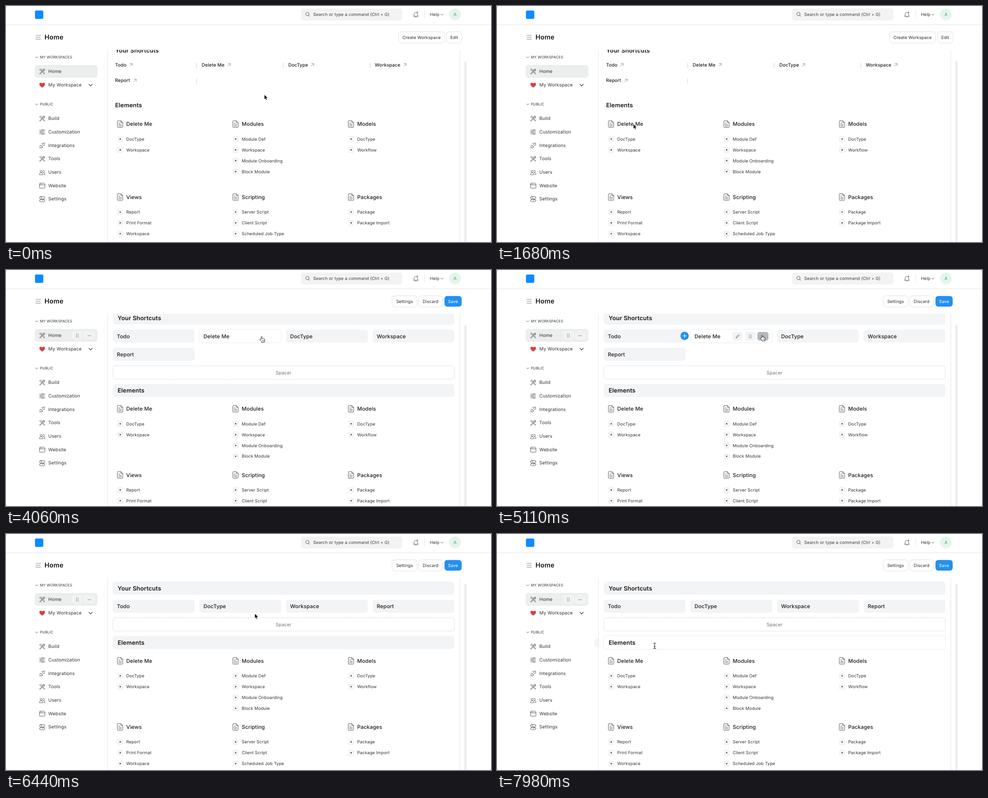
Write an HTML page that moves like this. It is 1072 px wide and 522 px high and loops after 8 s.

```html
<!DOCTYPE html>
<html lang="en">
<head>
<meta charset="utf-8">
<title>Workspace editor</title>
<style>
html, body { margin: 0; width: 100%; height: 100%; overflow: hidden; background: #bbb; }
svg { display: block; width: 1072px; height: 522px; }
text { font-family: Inter, "Open Sans", sans-serif; letter-spacing: .01em; fill: #333; white-space: pre; text-rendering: geometricPrecision; }
.m { font-weight: 500; fill: #1c1c1c; }
.b { font-weight: 600; fill: #171717; }
.i { fill: none; stroke: #444; stroke-width: .9; stroke-linecap: round; stroke-linejoin: round; }
.thin { stroke: #777; stroke-width: .8; }
.blk { fill: #f3f4f6; }
.spacer { fill: #fff; stroke: #c8ccd0; stroke-dasharray: 2 1.6; }
.btn { fill: #fff; filter: drop-shadow(0 .4px .8px rgba(0,0,0,.28)); }
.btn.hot { fill: #f0f1f2; }
.blk.hot { fill: #fff; }
.blk.hot, .spacer.hot { filter: drop-shadow(0 .4px 1px rgba(0,0,0,.18)); }
.save { fill: #2490ef; filter: none; }
.save.hot { fill: #1c82dc; }
.tool { fill: #f3f4f6; }
.tool.hot { fill: #b4b9be; }
.item, .link { fill: transparent; }
.item.hot { fill: #f3f3f3; }
.link.hot + g text { fill: #555; }
.menu { fill: #fff; filter: drop-shadow(0 1px 2px rgba(0,0,0,.22)); }
.panel { fill: #fff; filter: drop-shadow(0 0 1.3px rgba(0,0,0,.22)); }
</style>
</head>
<body>
<svg id="stage" viewBox="0 0 1072 522"></svg>
<script>
const SCALE = .7293, STEP = 70, LOOP = 8000;
const stage = document.getElementById('stage');

// y is the middle of the capitals
const text = (x, y, s, px = 13, cls = '', extra = '') =>
  `<text x="${x}" y="${y + px * .265}" font-size="${px * SCALE}" class="${cls}" ${extra}>${s}</text>`;
const rect = (x, y, w, h, r, extra) =>
  `<rect x="${x}" y="${y}" width="${w}" height="${h}" rx="${r}" ${extra}/>`;
const hit = (x, y, w, h, r, cls, cursor = 'hand', extra = '') =>
  rect(x, y, w, h, r, `class="${cls}" data-cursor="${cursor}" ${extra}`);
const icon = (x, y, d, cls = '', extra = '') =>
  `<path transform="translate(${x} ${y})" d="${d}" class="i ${cls}" ${extra}/>`;
const dots = (x, y) => [0, 1, 2, 3, 4, 5].map(i =>
  `<circle cx="${x - 1.8 + i % 2 * 3.6}" cy="${y - 3.2 + (i >> 1) * 3.2}" r=".85" fill="#666"/>`).join('');
const ellipsis = (x, y) => [-2.6, 0, 2.6].map(d =>
  `<circle cx="${x + d}" cy="${y}" r=".75" fill="#444"/>`).join('');
const group = (id, body) => `<g id="${id}">${body}</g>`;

const ICONS = {
  tools: 'M-5.5-4.3L-3.8-6-.6-3.4-1.2-1.2-3.4-1.8ZM1 1.6L4.6 5.6 5.8 4.4 2.2.8M-5.6 4.6L1-1.8C.5-4 2.2-6 4.6-5.4L2.8-3.6 3.7-2.6 5.5-4.3C6-2 4.2-.2 1.9-.8L-4.4 5.6Z',
  sliders: 'M-6-4H0M3-4H6M-6 0H-4M-1 0H6M-6 4H0M3 4H6M0-4a1.5 1.5 0 1 0 3 0 1.5 1.5 0 1 0-3 0M-4 0a1.5 1.5 0 1 0 3 0 1.5 1.5 0 1 0-3 0M0 4a1.5 1.5 0 1 0 3 0 1.5 1.5 0 1 0-3 0',
  plug: 'M-6 6L-4.2 4.2M-3.5-.5L1 4-.6 5C-2 6-4 5.5-4.7 4.2-5.6 3-5.2 1.2-3.5-.5M-1.8 1.2L-.6 0M0 2.8L1.2 1.6M6-6L4.2-4.2M-.8-3.8L3.8.8C5.5-.6 5.8-2.4 4.8-3.8 3.6-5.2 1.5-5.6-.8-3.8',
  users: 'M-4.5-1.8a2.3 2.3 0 1 0 4.6 0 2.3 2.3 0 1 0-4.6 0M-6 5C-6 1.6-4.5.8-2.2.8S1.6 1.6 1.6 5ZM1.6-4A2.3 2.3 0 1 1 2.2.5C4.5.6 6 1.6 6 5H3.6',
  window: 'M-4.6-5.5H4.6Q6-5.5 6-4V4Q6 5.5 4.6 5.5H-4.6Q-6 5.5-6 4V-4Q-6-5.5-4.6-5.5M-6-2H6M-4-3.7h.2M-2-3.7h.2',
  toggles: 'M-3.5-5.5H3.5a2.4 2.4 0 0 1 0 4.8H-3.5a2.4 2.4 0 0 1 0-4.8M-3.5.9H3.5a2.4 2.4 0 0 1 0 4.8H-3.5a2.4 2.4 0 0 1 0-4.8M-1.1-3.1a2.4 2.4 0 0 0-2.4-2.4M1.1 3.3a2.4 2.4 0 0 1 2.4-2.4',
  doc: 'M-4.5-7.3H1.8L5.8-3.3V5.8Q5.8 7.3 4.3 7.3H-4.5Q-6 7.3-6 5.8V-5.8Q-6-7.3-4.5-7.3M1.8-7.3V-3.3H5.8M-3.2-2H-.5M-3.2 1H3M-3.2 4H3',
  arrow: 'M-2.9 2.9L2.9-2.9M-2-2.9H2.9V2',
  chevron: 'M-2.5-1.3L0 1.3 2.5-1.3',
  pencil: 'M-3.5 3.5L-2.8 1.1 2-3.7 3.7-2 -1.1 2.8Z'
};

function header() {
  const chrome = rect(64, 10, 18.5, 18.5, 3, 'fill="#0d8bff"')
    + '<path d="M0 41.5H1072" stroke="#ebebeb" stroke-width="1.4"/>'
    + rect(652, 5.5, 224, 26.5, 6, 'fill="#f3f3f4"')
    + icon(666.6, 18.4, 'M-4-.6a3.7 3.7 0 1 0 7.4 0 3.7 3.7 0 1 0-7.4 0M2.2 2.2L4.6 4.6')
    + text(679, 18.7, 'Search or type a command (Ctrl + G)', 13, '', 'style="fill:#3c3c3c"')
    + icon(906, 19, 'M-5.3 3.5C-3.6 2.4-4-.2-3.6-2-3-4.2-1.6-5 0-5S3-4.2 3.6-2C4-.2 3.6 2.4 5.3 3.5ZM-1.4 5.3Q0 6.3 1.4 5.3')
    + '<circle cx="909.2" cy="14" r="1.4" fill="#cc5a5a"/><path d="M925.5 10V28" stroke="#e2e2e2"/>'
    + text(936.9, 18.7, 'Help') + icon(963.5, 19, ICONS.chevron)
    + '<circle cx="992.5" cy="18.5" r="13" fill="#e4f5e9"/>'
    + text(992.5, 18.7, 'A', 13, '', 'text-anchor="middle" style="fill:#4a9b78"');
  return chrome + icon(71, 69.2, 'M-5.3-4.2H5.3M-5.3 0H5.3M-5.3 4.2H5.3', '', 'style="stroke:#777"')
    + text(84.9, 68.8, 'Home', 20, 'b');
}

function sidebar() {
  const rows = [['Build', 'tools'], ['Customization', 'sliders'], ['Integrations', 'plug'], ['Tools', 'tools'],
    ['Users', 'users'], ['Website', 'window'], ['Settings', 'toggles']];
  return icon(68, 113.5, ICONS.chevron) + text(74.9, 113.2, 'MY WORKSPACES', 11)
    + rect(63.8, 130.8, 138, 27.5, 6, 'fill="#ebeeed" stroke="#e4e8e6" stroke-width=".6"')
    + icon(80, 145, ICONS.tools) + text(93.6, 144.6, 'Home', 14)
    + '<path transform="translate(80 175)" d="M0 5.6C-4 2.6-6.2.6-6.2-2-6.2-5.6-1.6-6.4 0-3.2 1.6-6.4 6.2-5.6 6.2-2 6.2.6 4 2.6 0 5.6" fill="#db3f47"/>'
    + text(93.6, 174.3, 'My Workspace', 14) + icon(187, 175, 'M-3.8-2L0 2 3.8-2', '', 'style="stroke-width:1.2"')
    + icon(68, 217.5, ICONS.chevron) + text(74.9, 217.2, 'PUBLIC', 11)
    + rows.map(([name, kind], i) => icon(80, 249 + i * 29.7, ICONS[kind])
      + text(93.6, 248.5 + i * 29.7, name, 14)).join('');
}

const CARDS = [
  [['Delete Me', 'DocType', 'Workspace'],
   ['Modules', 'Module Def', 'Workspace', 'Module Onboarding', 'Block Module'],
   ['Models', 'DocType', 'Workflow']],
  [['Views', 'Report', 'Print Format', 'Workspace', 'Dashboard'],
   ['Scripting', 'Server Script', 'Client Script', 'Scheduled Job Type'],
   ['Packages', 'Package', 'Package Import']]
];
const cards = (top, gap) => CARDS.map((row, r) => row.map(([title, ...items], c) => {
  const x = 265.8 + c * 255.2, y = top + r * gap;
  return icon(x - 13.6, y, ICONS.doc) + text(x, y, title, 16, 'm')
    + items.map((s, i) => {
      const iy = y + 33.1 + i * 23.95;
      return rect(x - 20.4, iy - 7, 14, 14, 4, 'fill="#f3f4f5"')
        + `<circle cx="${x - 13.4}" cy="${iy}" r="1.4" fill="#333"/>` + text(x, iy, s);
    }).join('');
}).join('')).join('');

function button(x, w, s, cls = '') {
  return hit(x, 57.6, w, 23.5, 6, 'btn ' + cls)
    + text(x + w / 2, 69.5, s, 13, '', `text-anchor="middle" style="fill:${cls ? '#fff' : '#2b2b2b'}"`);
}

const panel = '<rect x="225" y="85" width="777.5" height="480" class="panel"/>';
const scrollbar = y => rect(1013.2, y, 4.6, 420, 2, 'fill="#ebecec"');
const clip = body => `<g clip-path="url(#page)">${body}</g>`;

function viewPage() {
  const links = [[241.3, 130.2, 'Todo', 276], [432.6, 130.2, 'Delete Me', 493], [624, 130.2, 'DocType', 677.3],
    [815.3, 130.2, 'Workspace', 881.5], [241, 164.7, 'Report', 285]];
  return button(868.3, 100.4, 'Create Workspace') + button(974.3, 32.7, 'Edit') + scrollbar(122.5)
    + clip(panel + text(241.6, 98.6, 'Your Shortcuts', 18, 'b')
      + links.map(([x, y, s, ax]) => hit(x, y - 8, ax - x + 6, 16, 0, 'link')
        + `<g>${text(x, y, s, 14, 'm', 'font-weight="600"')}${icon(ax, y, ICONS.arrow, 'thin')}</g>`).join('')
      + '<path d="M421.5 126V137M612.5 126V137M804.5 126V137M421.5 160V171" stroke="#cfcfcf"/>'
      + text(241.2, 219.5, 'Elements', 18, 'b') + cards(261.2, 161.5));
}

function editPage(top, names, bar) {
  const rows = Math.ceil(names.length / 4), spacerY = top + 40.1 * (rows + 1), headY = spacerY + 40.1;
  const heading = (y, s) => hit(236, y, 755, 29, 6, 'blk', 'beam') + text(246.7, y + 14.5, s, 18, 'b');
  const handle = (y, id) => `<circle id="${id}" cx="223.5" cy="${y}" r="9.3" fill="#f4f5f5"/>`;
  return scrollbar(bar)
    + clip((rows == 1 ? handle(spacerY + 14.5, 'handleA') + handle(headY + 14.5, 'handleB') : '')
      + panel + heading(top, 'Your Shortcuts')
      + names.map((s, i) => {
        const x = 236 + i % 4 * 191.5, y = top + 40.1 * (1 + (i >> 2));
        return hit(x, y, 180.8, 28.8, 6, 'blk', 'hand', s == 'Delete Me' ? 'id="doomed"' : '') + text(x + 9.1, y + 14.5, s, 16, 'm');
      }).join('')
      + hit(236, spacerY - .2, 755, 29.5, 6, 'spacer', 'arrow', rows == 1 ? 'id="spacer"' : '')
      + text(613.5, spacerY + 15, 'Spacer', 14, '', 'text-anchor="middle" style="fill:#707070"')
      + heading(headY, 'Elements') + cards(headY + 55, 146.3));
}

const editBar = button(854, 54, 'Settings') + button(913, 51, 'Discard') + button(969.2, 38, 'Save', 'save')
  + rect(146, 135, 23.3, 19.3, 5, 'fill="#f1f3f3"') + dots(157.7, 145)
  + rect(172.3, 135, 23.7, 19.3, 5, 'fill="#f1f3f3"') + ellipsis(184, 145.5);

const controls = '<circle cx="414.7" cy="145.7" r="9.2" fill="#2490ef"/>'
  + icon(414.7, 145.7, 'M-4 0H4M0-4V4', '', 'style="stroke:#fff;stroke-width:1.2"')
  + [520, 548, 575.5].map(x => hit(x, 137, x > 570 ? 24.5 : 23.5, 19.3, 5, 'tool')).join('')
  + icon(531.8, 146.7, ICONS.pencil) + dots(559.7, 146.7) + ellipsis(587.5, 146.7);

const menu = rect(503, 162, 97, 129, 6, 'class="menu"')
  + [['Delete', 'M-4-3H4M-3-3L-2.4 4.5H2.4L3-3M-1.5-4.5H1.5'], ['Expand', 'M-4 0H4M2-2L4 0 2 2M-2-2L-4 0-2 2'],
    ['Shrink', 'M-4.5 0H-1M1 0H4.5M-3-2L-1 0-3 2M3-2L1 0 3 2'], ['Move Up', 'M0 4V-4M-3-1L0-4 3-1'],
    ['Move Down', 'M0-4V4M-3 1L0 4 3 1']].map(([s, d], i) => {
    const y = 177 + i * 24.2;
    return hit(506.5, y - 12, 90, 24, 5, 'item') + icon(516, y, d) + text(527, y, s);
  }).join('');

const cursors = group('arrow', '<path d="M0 0V10.8L2.5 8.5 4.2 12.4 6 11.6 4.3 7.8H7.6Z" fill="#000" stroke="#fff" stroke-width=".7"/>')
  + group('hand', '<path d="M-1.2 7V1.2a1.1 1.1 0 0 1 2.2 0V4.6Q2 4 2.8 5 4 4.5 4.6 5.5 6.8 5 7 7.2 7 9.5 6 11V13H-.2V11.4C-1.4 10.4-2.8 9-3.9 7.6-4.4 6.4-3 5.6-2.2 6.3Z" fill="#fff" stroke="#111" stroke-width=".9"/><path d="M1.6 8V10.6M3.3 8V10.6M5 8V10.6" stroke="#111" stroke-width=".6"/>')
  + group('beam', '<path d="M-3-6.3Q-1-6.3 0-5.2 1-6.3 3-6.3M0-5.2V5.2M-3 6.3Q-1 6.3 0 5.2 1 6.3 3 6.3M-1.6 1.6H1.6" fill="none" stroke="#222" stroke-width="1.1"/>');

stage.innerHTML = '<clipPath id="page"><rect y="97" width="1072" height="425"/></clipPath>'
  + rect(0, 0, 1072, 522, 3, 'fill="#fff"') + header() + sidebar()
  + group('view', viewPage()) + group('editBar', editBar)
  + group('before', editPage(91.7, ['Todo', 'Delete Me', 'DocType', 'Workspace', 'Report'], 122))
  + group('after', editPage(105.3, ['Todo', 'DocType', 'Workspace', 'Report'], 109.5))
  + group('controls', controls) + group('menu', menu) + group('pointer', cursors);

const $ = id => document.getElementById(id);
const targets = [...stage.querySelectorAll('[data-cursor]')];
const show = (id, on) => $(id).setAttribute('display', on ? 'inline' : 'none');

// start, end, x, y
const MOVES = [
  [0, 490, 471, 134], [630, 1120, 330, 271], [1120, 1330, 303, 263], [1610, 1680, 301.5, 261],
  [1680, 1750, 296.5, 256], [1750, 2450, 969, 33], [2450, 2590, 985, 30], [2590, 2870, 995, 66],
  [3710, 4060, 565, 147], [4060, 4550, 552, 145], [4550, 5110, 586, 144], [5670, 6090, 550, 176],
  [6440, 6930, 612, 152], [7070, 7910, 352, 222], [7910, 7980, 348.5, 247.5]
];
function pointerAt(t) {
  let px = 571, py = 196;
  for (const [a, b, x, y] of MOVES) {
    const k = Math.min(1, Math.max(0, (t - a) / (b - a))), e = k * k * (3 - 2 * k);
    px += (x - px) * e;
    py += (y - py) * e;
  }
  return [px, py];
}

function inside(r, x, y) {
  const v = name => r[name].baseVal.value;
  return !r.closest('[display=none]') && x >= v('x') && x <= v('x') + v('width') && y >= v('y') && y <= v('y') + v('height');
}

function draw(t) {
  const editing = t >= 3290, deleted = t >= 6440;
  show('view', !editing);
  show('editBar', editing);
  show('before', editing && !deleted);
  show('after', deleted);
  show('controls', t >= 4620 && !deleted);
  show('menu', t >= 5460 && !deleted);
  $('menu').setAttribute('opacity', t < 5530 ? .5 : 1);

  const [x, y] = pointerAt(t);
  const top = targets.findLast(r => inside(r, x, y));
  for (const r of targets) r.classList.toggle('hot', r === top || r.id == 'doomed' && t >= 4060);
  show('handleA', top === $('spacer'));
  show('handleB', t >= 7980);

  const kind = top ? top.dataset.cursor : 'arrow';
  for (const id of ['arrow', 'hand', 'beam']) show(id, id == kind);
  $('pointer').setAttribute('transform', `translate(${x} ${y})`);
}

const begin = performance.now();
function tick() {
  const t = (performance.now() - begin) % LOOP;
  draw(Math.floor(t / STEP) * STEP);
  requestAnimationFrame(tick);
}
tick();
</script>
</body>
</html>
```
